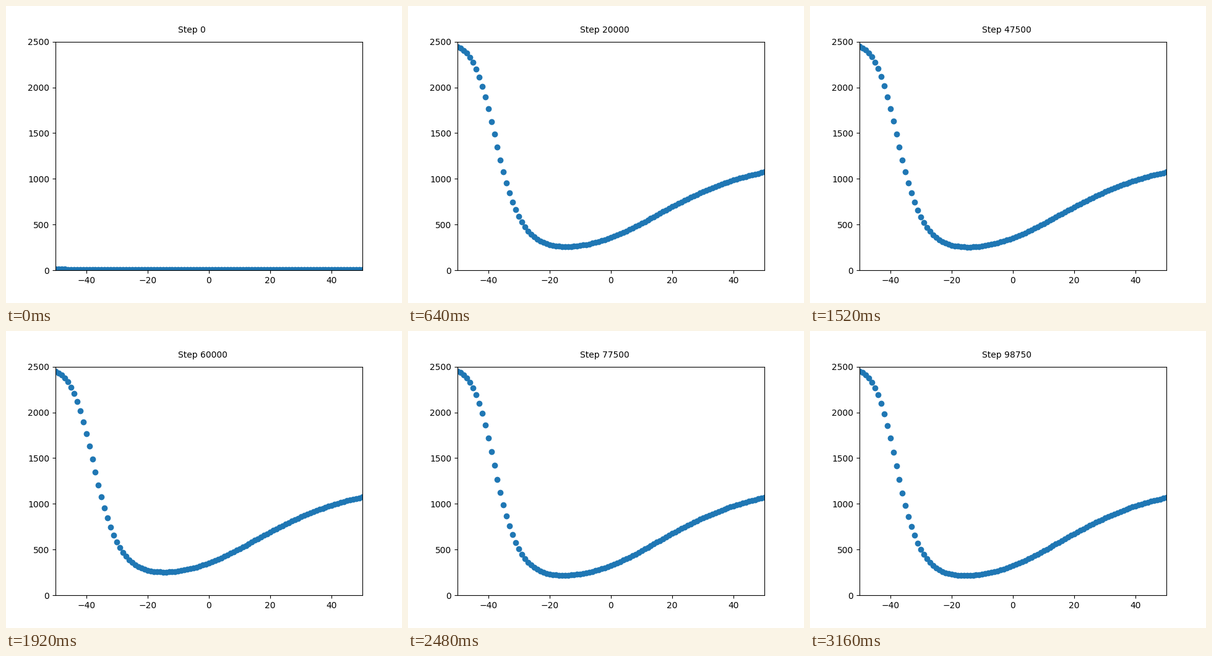
Write a matplotlib script that moves like this. It is 640x480 px and loops after 3.2 s.

```python
import numpy as np
import matplotlib.pyplot as plt
from matplotlib.animation import FuncAnimation

FRAMES = 80
INTERVAL = 40
STEPS_PER_FRAME = 1250
SWITCH = 48  # frame after which the second steady state takes over
LEFT_TOP, RIGHT_TOP = 2470, 1220

x = np.arange(-50, 51)


def sigmoid(u):
    return 1 / (1 + np.exp(-u))


def steady(base, edge, steepness, bend):
    """Falling front on the left and a slow rise on the right, above a base."""
    fall = sigmoid(steepness * (edge - x) + bend * np.exp(-(x + 50) / 6.1))
    rise = sigmoid(0.0542 * x - 0.895 - 0.98 * np.exp(-x / 17))
    return base + (LEFT_TOP - base) * fall + (RIGHT_TOP - base) * rise


early = steady(238, -38.17, 0.2105, 1.88)
first = steady(220, -38.17, 0.2105, 2.1)
second = steady(185, -38.72, 0.219, 2.2)
start = 5 + 0.00276 * first


def profile(n):
    if n <= SWITCH:
        goal = first + (early - first) * np.exp((5 - n) / 10)
        return goal + (start - goal) * np.exp(-n / 0.9)
    k = n - SWITCH
    rest = 0.65 * np.exp(-k / 2) + 0.35 * np.exp(-k / 10)
    return second + (first - second) * rest


fig, ax = plt.subplots(figsize=(6.4, 4.8), dpi=100)
ax.set_xlim(-50, 50)
ax.set_ylim(0, 2500)
dots, = ax.plot(x, profile(0), "o")
label = ax.text(-10, 2600, "Step 0")


def update(n):
    dots.set_ydata(profile(n))
    label.set_text(f"Step {n * STEPS_PER_FRAME}")
    return dots, label


anim = FuncAnimation(fig, update, frames=FRAMES, interval=INTERVAL,
                     repeat=True, repeat_delay=0)
plt.show()
```
